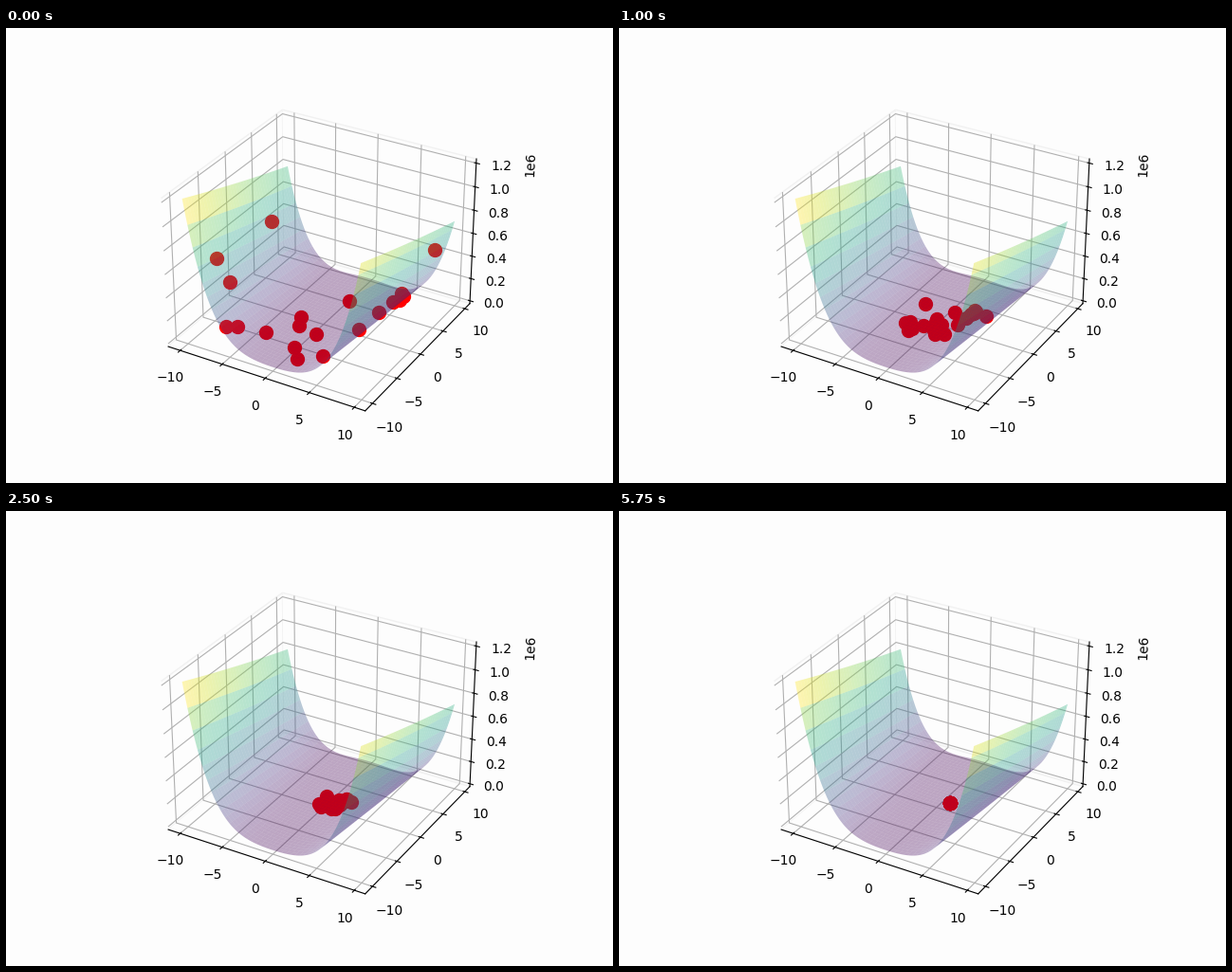
These frames come from a looping animation (640x480 px, 8 s). A matplotlib script:

```python
import numpy as np
import matplotlib.pyplot as plt
from matplotlib.animation import FuncAnimation

W, H, DPI = 640, 480, 100
STEP, FRAMES = 250, 32
PAPER = "#fdfdfd"
GOAL = np.array([1.0, 1.0])  # minimum of the valley

# Where the swarm sets off on the x-y plane
START = np.array([
    (-8.8, 4.5), (-8.5, -6.6), (-7.6, -5.7), (-5.9, -9.2), (-5.5, -7.8),
    (-3.7, -5.3), (0, -5.8), (1.3, -7.4), (0.5, -2.4), (-2.4, -0.4),
    (-1.8, -1.9), (3.5, -6.2), (4.1, 0), (0.3, 4.8), (4.3, 4),
    (4.6, 6.5), (5.2, 6.9), (5, 8), (4.5, 8.6), (9.1, 6.7),
])


def rosenbrock(x, y):
    return 100 * (y - x**2) ** 2 + (x - 1) ** 2


def spread(i):
    """Distance left to the goal: fast approach, slow drift, collapse."""
    return np.interp(i, [0, 2, 5, 10, 12], [1, 0.74, 0.2, 0.15, 0])


def padded(lo, hi, margin):
    pad = (hi - lo) * margin
    return lo - pad, hi + pad


fig = plt.figure(figsize=(W / DPI, H / DPI), dpi=DPI, facecolor=PAPER)
ax = fig.add_subplot(projection="3d", facecolor=PAPER)

grid = np.arange(-10, 10, 0.25)
x, y = np.meshgrid(grid, grid)
z = rosenbrock(x, y)
ax.plot_surface(x, y, z, cmap="viridis", alpha=0.35)

# Zorder 0 keeps the swarm beneath the translucent surface
dots, = ax.plot([], [], [], "ro", markersize=10, zorder=0)

side = padded(*padded(grid[0], grid[-1], 0.05), 1 / 48)
ax.set_xticks(range(-10, 11, 5))
ax.set_yticks(range(-10, 11, 5))
ax.set_zticks(np.arange(7) * 2e5)
ax.set_xlim(side)
ax.set_ylim(side)
ax.set_zlim(padded(z.min(), z.max(), 1 / 48))
for axis in (ax.xaxis, ax.yaxis, ax.zaxis):
    axis.set_pane_color(PAPER)
    axis.pane.set_edgecolor("#f1f1f1")


def draw(i):
    px, py = (GOAL + (START - GOAL) * spread(i)).T
    dots.set_data_3d(px, py, rosenbrock(px, py))
    return (dots,)


anim = FuncAnimation(fig, draw, frames=FRAMES, interval=STEP,
                     init_func=lambda: draw(0), repeat=True, repeat_delay=0)
plt.show()
```
